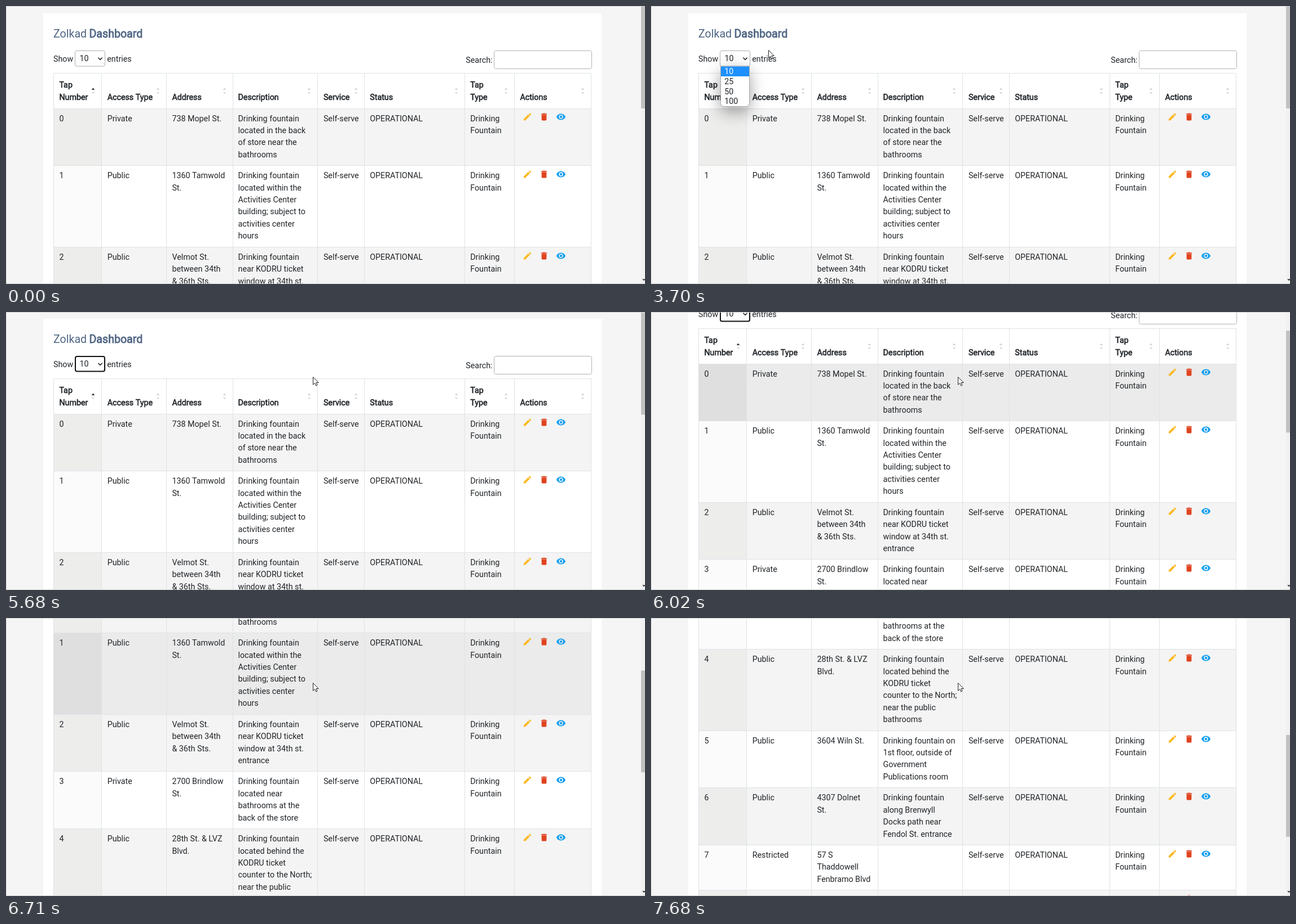
An HTML page with a canvas that plays this animation: 1133 px wide and 494 px high, repeating every 8000 ms.

```html
<!DOCTYPE html>
<html lang="en">
<head>
<meta charset="utf-8">
<title>Tap dashboard</title>
<style>
  html, body { margin: 0; width: 100%; height: 100%; overflow: hidden; background: #f5f5f5; }
  canvas { display: block; width: 1133px; height: 494px; }
</style>
</head>
<body>
<canvas id="stage" width="1133" height="494"></canvas>
<script>
const W = 1133, H = 494, LOOP = 8000;
const ctx = document.getElementById('stage').getContext('2d');

const SIZE = 14.27, LINE = 21.4, ROW_PAD = 16.1;
const HEAD_TOP = 119, BODY_TOP = 181.5;
const INK = '#212529', RULE = '#dee2e6', SLATE = '#4f6583';
const EDGES = [84, 169, 284, 402, 552, 635, 813, 901, 1037];
const TEXT_X = [94.4, 179.7, 294.4, 411.5, 562.9, 645.3, 823.2, 911.4];
const HEADERS = ['Tap|Number', 'Access Type', 'Address', 'Description', 'Service', 'Status', 'Tap|Type', 'Actions'];

// access, address, description
const ROWS = [
  ['Private', '738 Mopel St.', 'Drinking fountain|located in the back|of store near the|bathrooms'],
  ['Public', '1360 Tamwold|St.', 'Drinking fountain|located within the|Activities Center|building; subject to|activities center|hours'],
  ['Public', 'Velmot St.|between 34th|& 36th Sts.', 'Drinking fountain|near KODRU ticket|window at 34th st.|entrance'],
  ['Private', '2700 Brindlow|St.', 'Drinking fountain|located near|bathrooms at the|back of the store'],
  ['Public', '28th St. & LVZ|Blvd.', 'Drinking fountain|located behind the|KODRU ticket|counter to the North;|near the public|bathrooms'],
  ['Public', '3604 Wiln St.', 'Drinking fountain on|1st floor, outside of|Government|Publications room'],
  ['Public', '4307 Dolnet|St.', 'Drinking fountain|along Brenwyll|Docks path near|Fendol St. entrance'],
  ['Restricted', '57 S|Thaddowell|Fenbramo Blvd', ''],
  ['Public', '', 'Drinking fountain']
];

// start ms, pointer x, pointer y, scroll offset, hovered row
const STEPS = [
  [0, -50, -50], [330, 694, 118], [690, 669, 54], [1680, 568.5, 58], [2020, 341, 51],
  [2350, 158, 80], [2680, 151, 89], [3350, 151, 108], [3700, 208, 78], [4030, 278, 76],
  [4360, 159, 96], [4700, 312, 91], [5030, 507, 102], [5370, 544, 115],
  [5680, 544, 115, 1], [6020, 544, 115, 90, 0], [6370, 544, 115, 182, 0],
  [6710, 544, 115, 257, 1], [7010, 544, 115, 332, 1], [7370, 544, 115, 456, 2], [7680, 544, 115, 576, 2]
];
const POPUP_OPEN = 3020, POPUP_CLOSE = 4700;

const ICONS = [
  [924.5, '#fbb822', 'M3 17.25V21h3.75L17.81 9.94l-3.75-3.75zM20.71 7.04c.39-.39.39-1.02 0-1.41l-2.34-2.34c-.39-.39-1.02-.39-1.41 0l-1.83 1.83 3.75 3.75z'],
  [954, '#e0431f', 'M6 19c0 1.1.9 2 2 2h8c1.1 0 2-.9 2-2V7H6zM19 4h-3.5l-1-1h-5l-1 1H5v2h14z'],
  [984, '#139ff0', 'M12 4.5C7 4.5 2.73 7.61 1 12c1.73 4.39 6 7.5 11 7.5s9.27-3.11 11-7.5c-1.73-4.39-6-7.5-11-7.5zM12 7a5 5 0 1 0 0 10a5 5 0 1 0 0-10zM12 9a3 3 0 1 0 0 6a3 3 0 1 0 0-6z']
].map(([x, color, d]) => ({ x, color, path: new Path2D(d) }));
const POINTER = new Path2D('M.5 .6V14.2L3.7 11.3 5.7 16 7.9 15 5.9 10.5H10.2z');

function rect(x, y, w, h, color) {
  ctx.fillStyle = color;
  ctx.fillRect(x, y, w, h);
}

function text(str, x, y, { color = INK, size = SIZE, bold = false } = {}) {
  ctx.font = size + 'px Roboto, sans-serif';
  ctx.fillStyle = ctx.strokeStyle = color;
  ctx.fillText(str, x, y);
  if (bold) {
    ctx.lineWidth = size / 25;
    ctx.strokeText(str, x, y);
  }
}

function lines(str, x, y, opts) {
  str.split('|').forEach((s, i) => text(s, x, Math.round(y + i * LINE), opts));
}

function box(x, y, w, h, r, stroke, width = 1, fill = '#fff') {
  ctx.beginPath();
  ctx.roundRect(x, y, w, h, r);
  ctx.fillStyle = fill;
  ctx.fill();
  ctx.strokeStyle = stroke;
  ctx.lineWidth = width;
  ctx.stroke();
}

function triangle(x, y, half, height, color) {
  ctx.beginPath();
  ctx.moveTo(x - half, y);
  ctx.lineTo(x + half, y);
  ctx.lineTo(x, y + height);
  ctx.fillStyle = color;
  ctx.fill();
}

function drawControls(focused) {
  text('Zolkad', 84, 56, { color: SLATE, size: 19.6 });
  text('Dashboard', 147.5, 56, { color: SLATE, size: 19.6, bold: true });
  text('Show', 84, 99);
  if (focused) box(123, 80, 52, 26.5, 3, '#101010', 2);
  else box(122.5, 79.5, 53, 27.5, 3, '#adadad');
  text('10', 130.6, 98);
  ctx.beginPath();
  ctx.moveTo(163.4, 91.8);
  ctx.lineTo(167, 95.4);
  ctx.lineTo(170.6, 91.8);
  ctx.strokeStyle = INK;
  ctx.lineWidth = 1.6;
  ctx.stroke();
  text('entries', 179.3, 99);
  text('Search:', 815.2, 101);
  box(865.5, 79.5, 173, 32, 3, '#b2b2b2');
}

function drawHeader() {
  HEADERS.forEach((label, i) => {
    const two = label.includes('|');
    lines(label, TEXT_X[i], two ? 145.4 : 167, { bold: true });
    const x = EDGES[i + 1] - 14.5;
    triangle(x, 149, 2.8, -3.6, i ? '#d2d4d6' : '#333');
    triangle(x, 153, 2.8, 3.6, '#d8dadc');
  });
  rect(84, HEAD_TOP, 954, 1, RULE);
  EDGES.forEach(x => rect(x, HEAD_TOP, 1, 63, RULE));
}

function drawRow(i, top, bottom, hovered) {
  const y = Math.round(top), h = Math.round(bottom) - y;
  const odd = i % 2;
  const fill = hovered ? '#ebebeb' : odd ? '#fff' : '#f4f4f4';
  const first = hovered ? '#dfdfdf' : odd ? '#fbfbfb' : '#ededec';
  rect(84, y, 954, h, fill);
  rect(84, y, 86, h, first);
  rect(84, y, 954, 1, RULE);
  EDGES.forEach(x => rect(x, y, 1, h, RULE));
  const cells = [String(i), ...ROWS[i], 'Self-serve', 'OPERATIONAL', 'Drinking|Fountain'];
  cells.forEach((s, c) => lines(s, TEXT_X[c], top + 23));
  ICONS.forEach(icon => {
    ctx.save();
    ctx.translate(icon.x, Math.round(top + 15.8));
    ctx.scale(0.727, 0.727);
    ctx.translate(-12, -12);
    ctx.fillStyle = icon.color;
    ctx.fill(icon.path, 'evenodd');
    ctx.restore();
  });
}

function drawTable(scroll, hover) {
  drawHeader();
  let top = BODY_TOP;
  ROWS.forEach((row, i) => {
    const count = Math.max(2, ...row.map(s => s.split('|').length));
    const bottom = top + count * LINE + ROW_PAD;
    if (bottom > scroll && top < scroll + H) drawRow(i, top, bottom, hover === i);
    top = bottom;
  });
}

function drawPopup() {
  ctx.save();
  ctx.shadowColor = 'rgba(0,0,0,.38)';
  ctx.shadowBlur = 28;
  ctx.shadowOffsetY = 9;
  ctx.beginPath();
  ctx.roundRect(123.5, 107, 51, 71.5, [0, 0, 6, 6]);
  ctx.fillStyle = '#fff';
  ctx.fill();
  ctx.restore();
  box(123.5, 107, 51, 71.5, [0, 0, 6, 6], '#a8a8a8');
  rect(124, 107.5, 50, 17.5, '#1e90ff');
  ['10', '25', '50', '100'].forEach((s, i) =>
    text(s, 130.3, Math.round(121 + i * 17.8), { color: i ? INK : '#fff' }));
}

function drawScrollbar(scroll) {
  rect(1126, 0, 7, H, '#f1f1f1');
  rect(1126, 1 + scroll * 0.359, 7, 181, '#c1c1c1');
  triangle(1131, 485, 3, 3.4, '#505050');
}

function draw(t) {
  const [, px, py, scroll = 0, hover = -1] = STEPS.findLast(s => s[0] <= t);
  rect(0, 0, W, H, '#f5f5f5');
  ctx.save();
  ctx.translate(0, -scroll);
  rect(66, 13, 990, 1500, '#fff');
  drawControls(t >= POPUP_CLOSE);
  drawTable(scroll, hover);
  ctx.restore();
  drawScrollbar(scroll);
  if (t >= POPUP_OPEN && t < POPUP_CLOSE) drawPopup();
  rect(0, 0, W, 1, '#cfcfcf');
  rect(0, 0, 1, H, '#cfcfcf');
  rect(0, H - 1, W, 1, '#cfcfcf');
  ctx.save();
  ctx.translate(px, py);
  ctx.fillStyle = '#fff';
  ctx.fill(POINTER);
  ctx.strokeStyle = '#222';
  ctx.lineWidth = 1;
  ctx.stroke(POINTER);
  ctx.restore();
}

const start = performance.now();
function tick() {
  draw((performance.now() - start) % LOOP);
  requestAnimationFrame(tick);
}
tick();
</script>
</body>
</html>
```
